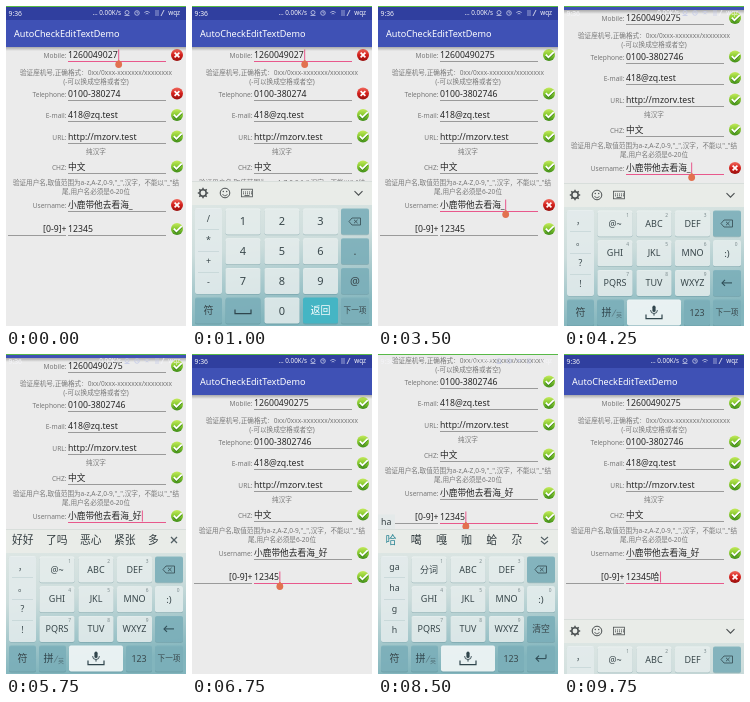
These frames come from a looping animation (180x320 px, 10 s). An HTML page with a canvas:

```html
<!DOCTYPE html>
<html lang="zh">
<head>
<meta charset="utf-8">
<title>AutoCheckEditTextDemo</title>
<style>
html, body { margin: 0; width: 100%; height: 100%; overflow: hidden; background: #ebebeb; }
canvas { display: block; width: 180px; height: 320px; }
</style>
</head>
<body>
<canvas id="stage"></canvas>
<script>
const W = 180, H = 320, LOOP = 10000, STEP = 250, KEYBOARD_TOP = 175;
const FONT = '"Noto Sans", "Noto Sans CJK SC", "Noto Sans CJK", sans-serif';
const PINK = '#e8588c', HANDLE = '#e2714f', INK = '#262626', TEAL = '#2f8796';

const canvas = document.getElementById('stage');
const ratio = window.devicePixelRatio || 1;
canvas.width = W * ratio;
canvas.height = H * ratio;
const ctx = canvas.getContext('2d');

// Keyframes: [time, value]
const SLIDE = [[0, 145], [250, 62], [500, 0], [3000, 0], [3250, 75], [3500, 145],
  [3750, 110], [4000, 30], [4250, 2], [4500, 0], [6250, 0], [6500, 75], [6750, 145],
  [7000, 145], [7250, 70], [7500, 9], [7750, 0], [9500, 0], [9750, 90], [10000, 145]];
const PAN = [[3500, 0], [4000, -37], [6250, -37], [6500, 0], [7000, 0],
  [7250, -45], [7500, -60], [9500, -60], [9750, 0]];

function track(frames, t) {
  if (t <= frames[0][0]) return frames[0][1];
  for (let i = 1; i < frames.length; i++) {
    const [t0, a] = frames[i - 1], [t1, b] = frames[i];
    if (t <= t1) return a + (b - a) * (t - t0) / (t1 - t0);
  }
  return frames[frames.length - 1][1];
}

function rect(x, y, w, h, color) {
  ctx.fillStyle = color;
  ctx.fillRect(x, y, w, h);
}

function text(s, x, y, size, color, align = 'left', weight = 400) {
  ctx.font = `${weight} ${size}px ${FONT}`;
  ctx.textAlign = align;
  ctx.textBaseline = 'alphabetic';
  ctx.fillStyle = color;
  ctx.fillText(s, x, y + size * 0.36);
}

function line(points, color, width = 1) {
  ctx.strokeStyle = color;
  ctx.lineWidth = width;
  ctx.beginPath();
  points.forEach(([x, y], i) => i ? ctx.lineTo(x, y) : ctx.moveTo(x, y));
  ctx.stroke();
}

function disc(x, y, r, color) {
  ctx.fillStyle = color;
  ctx.beginPath();
  ctx.arc(x, y, r, 0, 7);
  ctx.fill();
}

function arc(x, y, r, color, width = 1, from = 0, to = 7) {
  ctx.strokeStyle = color;
  ctx.lineWidth = width;
  ctx.beginPath();
  ctx.arc(x, y, r, from, to);
  ctx.stroke();
}

function rounded(x, y, w, h, r, color) {
  ctx.fillStyle = color;
  ctx.beginPath();
  ctx.roundRect(x, y, w, h, r);
  ctx.fill();
}

function gradient(x0, y0, x1, y1, colors) {
  const fill = ctx.createLinearGradient(x0, y0, x1, y1);
  colors.forEach((c, i) => fill.addColorStop(i / (colors.length - 1), c));
  return fill;
}

function statusIcon(x, y, ok) {
  const colors = ok ? ['#c4ea5c', '#86c92f', '#3f8d18'] : ['#f0685c', '#d3201c', '#98100e'];
  disc(x, y, 6, gradient(x, y - 6, x, y + 6, colors));
  if (ok) {
    const tick = [[x - 3.2, y - 0.3], [x - 0.6, y + 2.3], [x + 4.8, y - 2.8]];
    line(tick.map(([px, py]) => [px, py + 0.9]), '#3a7d18', 1.8);
    line(tick, '#fff', 1.8);
  } else {
    line([[x - 2.4, y - 2.4], [x + 2.4, y + 2.4]], '#fff', 1.7);
    line([[x + 2.4, y - 2.4], [x - 2.4, y + 2.4]], '#fff', 1.7);
  }
}

function fieldsAt(t) {
  const mobile = t >= 1250, phone = t >= 2750, user = t >= 5500, laugh = t >= 9000;
  return [
    ['Mobile:', 49, '1260049027' + (mobile ? '5' : ''), mobile],
    ['Telephone:', 87.5, '0100-380274' + (phone ? '6' : ''), phone],
    ['E-mail:', 109, '418@zq.test', true],
    ['URL:', 130.5, 'http://mzorv.test', true],
    ['CHZ:', 160.5, '中文', true],
    ['Username:', 199, '小鹿带他去看海_' + (user ? '好' : ''), user],
    ['[0-9]+', 223, '12345' + (laugh ? '哈' : ''), !laugh],
  ];
}

function drawField([label, y, value, ok], focused, handle) {
  const last = label === '[0-9]+';
  const base = Math.round(y + 6);
  text(label, 60.5, y + (last ? 0 : 0.7), last ? 8.7 : 6.6, last ? INK : '#777', 'right');
  text(value, 62, y, 8.7, INK);
  const end = 62.5 + ctx.measureText(value).width;
  rect(62, base, 98, 1, focused ? PINK : '#9a9a9a');
  if (last) rect(2, base, 58, 1, '#9a9a9a');
  statusIcon(171, y, ok);
  if (!focused) return;
  rect(end, y - 5.5, 1, 11, PINK);
  if (handle) {
    line([[end + 0.5, y + 5], [end - 2, y + 8], [end + 3, y + 8], [end + 0.5, y + 5]], HANDLE);
    disc(end + 0.5, y + 9.5, 3.4, HANDLE);
  }
}

function drawForm(t) {
  const focus = t < 1750 ? 0 : t < 3500 ? 1 : t < 6750 ? 5 : 6;
  const justTyped = [[1250, 1750], [2750, 3500], [4750, 6750], [9000, LOOP]]
    .some(([from, to]) => t >= from && t < to);
  ctx.save();
  ctx.translate(0, track(PAN, t));
  const hint = (s, y) => text(s, 90, y, 6.6, '#777', 'center');
  hint('验证座机号,正确格式：0xx/0xxx-xxxxxxx/xxxxxxxx', 67);
  hint('(-可以换成空格或者空)', 75.5);
  hint('纯汉字', 145.5);
  hint('验证用户名,取值范围为a-z,A-Z,0-9,"_",汉字，不能以"_"结', 177);
  hint('尾,用户名必须是6-20位', 185.5);
  fieldsAt(t).forEach((field, i) => drawField(field, i === focus, !justTyped));
  rect(0, 0, W, 14, '#303f9f');
  rect(0, 14, W, 27, '#3f51b5');
  rect(0, 41, W, 4, gradient(0, 41, 0, 45, ['rgba(0,0,0,.28)', 'rgba(0,0,0,0)']));
  text('AutoCheckEditTextDemo', 8, 27.3, 9.1, '#fff', 'left', 500);
  ctx.restore();
}

function drawStatusBar() {
  const white = '#f4f4f8', pale = '#c3c9e8';
  text('9:36', 2.5, 7.3, 6.8, white);
  text('... 0.00K/s', 115, 7, 6.3, white, 'right');
  arc(121, 6.5, 2, pale, 0.8);
  line([[118.5, 9.5], [123.5, 9.5]], pale, 0.8);
  arc(131, 7, 2.3, pale, 0.8);
  line([[131, 5.5], [131, 7], [132.3, 7]], pale, 0.7);
  for (const r of [2, 4]) arc(141, 9.5, r, pale, 0.8, -2.3, -0.84);
  for (const y of [5, 7, 9]) line([[149, y], [153, y]], pale, 0.7);
  line([[155, 10], [158, 4]], white, 0.8);
  text('wqz', 174, 7, 6.3, white, 'right');
  rect(0, 0, W, 1, '#58b947');
}

function key(cx, cy, w, label, options = {}) {
  const { tint = false, fill, color = '#39474b', size = 9.5, digit } = options;
  const h = 26;
  rounded(cx - w / 2, cy - h / 2 + 0.8, w, h, 2, 'rgba(60,110,120,.3)');
  rounded(cx - w / 2, cy - h / 2, w, h, 2, fill || (tint ? 'rgba(126,178,188,.85)' : 'rgba(244,248,247,.78)'));
  if (digit) text(digit, cx + w / 2 - 5, cy - 8.5, 4.8, '#7b8a8d', 'center');
  if (label) text(label, cx, cy, size, color, 'center');
}

function arrow(cx, cy) {
  line([[cx + 5, cy], [cx - 5, cy]], '#304f58', 1.1);
  line([[cx - 2, cy - 3], [cx - 5, cy], [cx - 2, cy + 3]], '#304f58', 1.1);
}

function backspace(cx, cy) {
  line([[cx - 6, cy], [cx - 3, cy - 3.5], [cx + 5.5, cy - 3.5], [cx + 5.5, cy + 3.5],
    [cx - 3, cy + 3.5], [cx - 6, cy]], '#3d555c', 0.9);
  line([[cx - 1, cy - 1.7], [cx + 2.6, cy + 1.7]], '#3d555c', 0.9);
  line([[cx + 2.6, cy - 1.7], [cx - 1, cy + 1.7]], '#3d555c', 0.9);
}

function sideList(items) {
  rounded(3, 202.5, 27, 86, 2, 'rgba(60,110,120,.3)');
  rounded(3, 202, 27, 86, 2, 'rgba(240,246,245,.8)');
  items.forEach((s, i) => {
    if (i) rect(6, 202 + i * 21.5, 21, 0.5, '#b4c8cb');
    text(s, 16.5, 212.7 + i * 21, 8.8, '#39474b', 'center');
  });
}

function spaceMark(cx, cy) {
  line([[cx - 8, cy - 1], [cx - 8, cy + 3], [cx + 8, cy + 3], [cx + 8, cy - 1]], '#2f454c', 1.2);
}

function microphone(cx, cy) {
  rounded(cx - 1.6, cy - 7, 3.2, 6.5, 1.6, '#30454c');
  arc(cx, cy - 2.5, 3.4, '#30454c', 0.9, 0, Math.PI);
  line([[cx, cy + 1], [cx, cy + 3]], '#30454c');
}

const COLUMNS = [51, 90, 128.5], RIGHT = 163;
const rowY = i => 215.5 + i * 29.7;

function drawNumberKeys() {
  sideList(['/', '*', '+', '-']);
  for (let n = 0; n < 9; n++) {
    key(COLUMNS[n % 3], rowY(Math.floor(n / 3)), 35, String(n + 1), { size: 11 });
  }
  key(RIGHT, rowY(0), 28, '', { tint: true });
  backspace(RIGHT, rowY(0));
  key(RIGHT, rowY(1), 28, '.', { tint: true, size: 11 });
  key(RIGHT, rowY(2), 28, '@', { tint: true, size: 11 });
  key(16.5, rowY(3), 27, '符', { tint: true, size: 10 });
  key(51, rowY(3), 35, '', { tint: true });
  spaceMark(51, rowY(3));
  key(90, rowY(3), 35, '0', { size: 11 });
  key(128.5, rowY(3), 35, '返回', { fill: '#45b5c4', color: '#fff', size: 10 });
  key(RIGHT, rowY(3), 28, '下一项', { tint: true, size: 7.6 });
}

function drawLetterKeys(t, typed) {
  sideList(typed ? (typed === 'h' ? ['g', 'h', 'i', '4'] : ['ga', 'ha', 'g', 'h']) : ['，', '。', '?', '!']);
  const letters = [typed ? '分词' : '@~', 'ABC', 'DEF', 'GHI', 'JKL', 'MNO', 'PQRS', 'TUV', 'WXYZ'];
  letters.forEach((s, n) =>
    key(COLUMNS[n % 3], rowY(Math.floor(n / 3)), 35, s, { size: 9, digit: String(n + 1) }));
  key(RIGHT, rowY(0), 28, '', { tint: true });
  backspace(RIGHT, rowY(0));
  key(RIGHT, rowY(1), 28, ':)', { size: 9.5, digit: '0' });
  key(RIGHT, rowY(2), 28, typed ? '清空' : '', { tint: true, size: 8.8 });
  if (!typed) arrow(RIGHT, rowY(2));
  const y = rowY(3);
  key(16.5, y, 27, '符', { tint: true, size: 10 });
  key(46.5, y, 27, '', { tint: true });
  text('拼', 42.5, y, 10, '#30454c', 'center');
  line([[48, y + 4], [52, y - 3]], '#53737b', 0.7);
  text('英', 55, y + 2, 6, '#53737b', 'center');
  key(90, y, 54, '', { fill: 'rgba(246,250,250,.9)' });
  microphone(90, y);
  spaceMark(90, y + 3);
  key(133, y, 26, '123', { tint: true, size: 8.8 });
  const done = t >= 6750;
  key(RIGHT, y, 28, typed ? '' : done ? '完成' : '下一项', { tint: true, size: done ? 9 : 7.6 });
  if (typed) {
    arrow(RIGHT, y);
    line([[RIGHT + 5, y], [RIGHT + 5, y - 4]], '#304f58', 1.1);
  }
}

function drawToolbar() {
  const gray = '#4a4f50', y = 187;
  arc(11, y, 3.2, gray, 1.5);
  for (let a = 0; a < 8; a++) {
    const c = Math.cos(a * Math.PI / 4), s = Math.sin(a * Math.PI / 4);
    line([[11 + c * 3.5, y + s * 3.5], [11 + c * 5.2, y + s * 5.2]], gray, 1.5);
  }
  arc(33, y, 4.8, gray);
  arc(33, y + 0.3, 2.5, gray, 0.8, 0.3, 2.84);
  disc(31.3, y - 1.5, 0.7, gray);
  disc(34.7, y - 1.5, 0.7, gray);
  ctx.strokeStyle = gray;
  ctx.strokeRect(49.5, y - 3.8, 11, 7.6);
  for (const dy of [-1.5, 0.3]) for (let x = 51; x < 60; x += 2) rect(x, y + dy, 1, 1, gray);
  rect(52.5, y + 2.1, 5, 0.8, gray);
  line([[162.5, y - 1.8], [166.5, y + 2.2], [170.5, y - 1.8]], gray, 1.1);
}

function typedAt(t) {
  if (t >= 4750 && t < 5500) return ['h', 'ha', 'hao'][(t - 4750) / STEP];
  if (t >= 8000 && t < 9000) return t < 8250 ? 'h' : 'ha';
  return '';
}

function drawCandidates(t, typed) {
  if (typed) {
    const words = typed === 'hao' ? '好号浩毫豪耗' : typed === 'h' ? '个好和还给会' : '哈噶嘎咖蛤尕';
    [...words].forEach((s, i) => text(s, 13 + i * 25.2, 186.5, 11, i ? '#333d40' : TEAL, 'center'));
    for (const y of [183, 187]) line([[163, y], [166.5, y + 3], [170, y]], '#536064', 1.1);
    rect(0, 160.5, 17, 14.5, '#e4e9e9');
    text(typed, 3, 167.5, 8.8, '#333d40');
    return;
  }
  const words = t < 9000 ? ['好好', '了吗', '恶心', '紧张', '多'] : ['哈哈', '的', '你', '我', '是'];
  words.forEach((s, i) => text(s, 6 + i * 34, 186, 10.8, '#333d40'));
  line([[165, 183], [171, 189]], '#536064', 1.2);
  line([[171, 183], [165, 189]], '#536064', 1.2);
}

function drawKeyboard(t) {
  const slide = track(SLIDE, t);
  if (slide >= 145) return;
  const typed = typedAt(t);
  const predicting = (t >= 5500 && t < 6250) || (t >= 9000 && t < 9500);
  ctx.save();
  ctx.translate(0, slide);
  rect(0, KEYBOARD_TOP, W, H - KEYBOARD_TOP,
    gradient(0, KEYBOARD_TOP, 20, H, ['#e4eae7', '#cddddc', '#82b5bd']));
  rect(0, KEYBOARD_TOP, W, 24, '#e9ece8');
  rect(0, KEYBOARD_TOP, W, 0.7, '#d2d8d6');
  if (typed || predicting) drawCandidates(t, typed);
  else drawToolbar();
  if (t < 3500) drawNumberKeys();
  else drawLetterKeys(t, typed);
  ctx.restore();
}

function frame(now) {
  const t = Math.floor((now % LOOP) / STEP) * STEP;
  ctx.setTransform(ratio, 0, 0, ratio, 0, 0);
  rect(0, 0, W, H, '#ebebeb');
  drawForm(t);
  drawStatusBar();
  drawKeyboard(t);
}

const start = performance.now();
function tick() {
  frame(performance.now() - start);
  requestAnimationFrame(tick);
}
tick();
</script>
</body>
</html>
```
